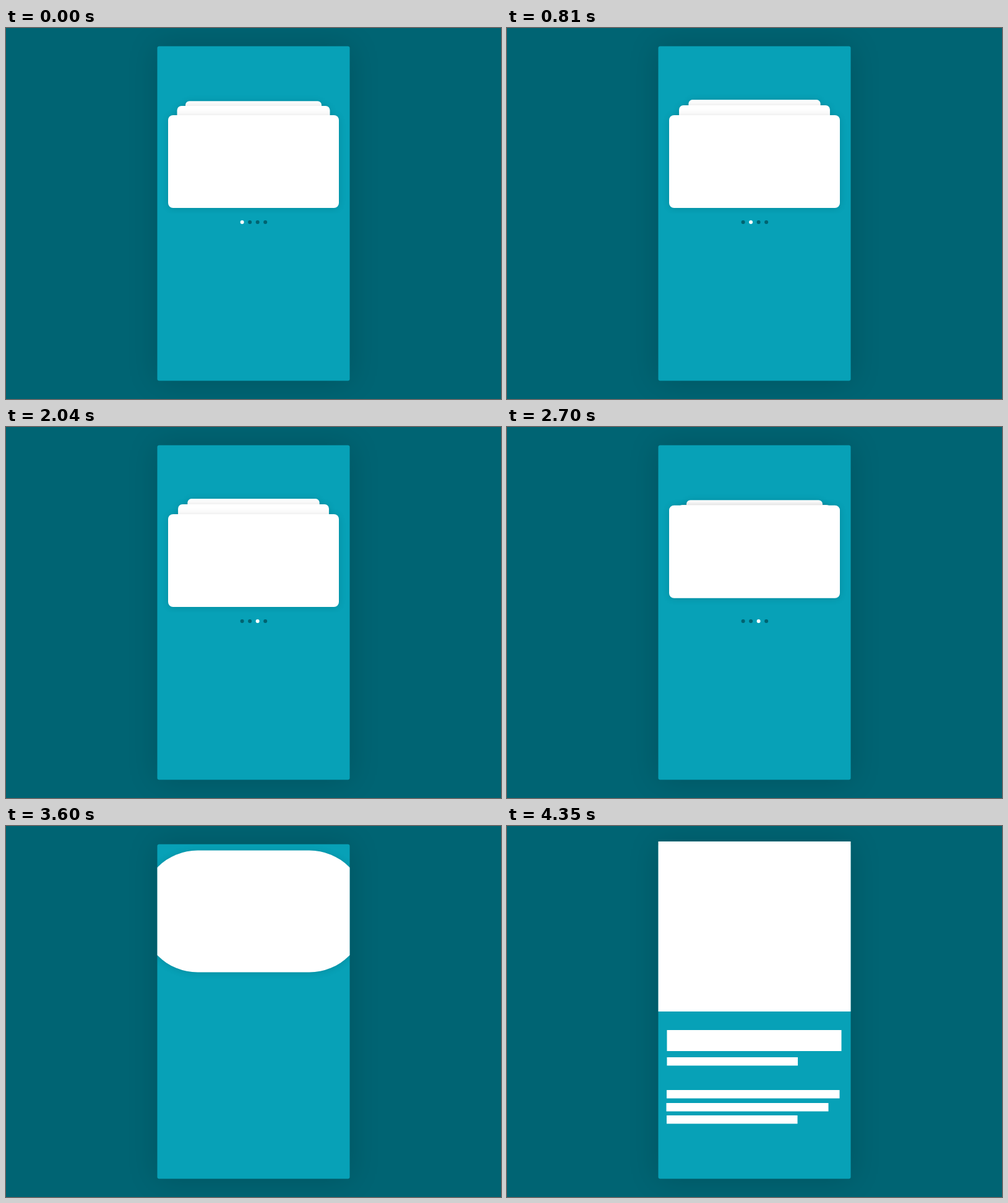
These frames come from a looping animation (800 px wide and 600 px high, 4500 ms). An HTML page with a canvas:

```html
<!DOCTYPE html>
<html lang="en">
<head>
<meta charset="utf-8">
<title>Card stack</title>
<style>
  html, body { margin: 0; width: 100%; height: 100%; overflow: hidden; background: #006473; }
  canvas { display: block; }
</style>
</head>
<body>
<canvas id="stage" width="800" height="600"></canvas>
<script>
const ctx = document.getElementById('stage').getContext('2d');
const LOOP = 4500;
const CARD = { w: 276, h: 150, r: 8 };
const PHONE = { x: 244.5, y: 29.5, w: 311, h: 541 };
const SWIPES = [180, 1410];
const LIFT = 78;

// Resting places in the stack, front to back.
const SLOTS = [
  { y: 216, s: 1 },
  { y: 193, s: 0.895 },
  { y: 178, s: 0.797 },
  { y: 170, s: 0.748 }
];

// Lines of the detail view: x, y, width, height, start time.
const BARS = [
  [258.5, 330, 282, 34, 3660],
  [258.5, 374, 211.5, 13.5, 3710],
  [258, 427, 279.5, 13.5, 3750],
  [257.5, 448, 262, 13.5, 3790],
  [258, 468, 211.5, 13.5, 3790]
];

const clamp = v => Math.min(1, Math.max(0, v));
const span = (t, from, length) => clamp((t - from) / length);
const smooth = p => p * p * (3 - 2 * p);
const mix = (a, b, p) => a + (b - a) * p;

function shadow(color, blur, dy) {
  ctx.shadowColor = color;
  ctx.shadowBlur = blur;
  ctx.shadowOffsetY = dy;
}

function box(x, y, w, h, r) {
  ctx.beginPath();
  ctx.roundRect(x, y, w, h, r);
}

function card(x, y, s, radius = CARD.r, alpha = 1) {
  if (alpha <= 0) return;
  const w = CARD.w * s, h = CARD.h * s;
  ctx.save();
  ctx.globalAlpha = alpha;
  ctx.fillStyle = '#fff';
  shadow('rgba(0,0,0,0.13)', 12, 1);
  box(x - w / 2, y - h / 2, w, h, radius * s);
  ctx.fill();
  ctx.restore();
}

function backdrop() {
  ctx.fillStyle = '#006473';
  ctx.fillRect(0, 0, 800, 600);
  ctx.save();
  shadow('rgba(0,0,0,0.16)', 50, 0);
  ctx.fillStyle = '#07a1b7';
  box(PHONE.x, PHONE.y, PHONE.w, PHONE.h, 3);
  ctx.fill();
  ctx.restore();
}

function dots(t, alpha) {
  const active = SWIPES.filter(b => t >= b).length;
  ctx.globalAlpha = alpha;
  for (let i = 0; i < 4; i++) {
    ctx.fillStyle = i === active ? '#fff' : '#016371';
    ctx.beginPath();
    ctx.arc(381.6 + i * 12.5, 314, 3, 0, Math.PI * 2);
    ctx.fill();
  }
  ctx.globalAlpha = 1;
}

// The front card leaves to the left, the others step forward one by one.
function swipe(t) {
  for (let i = 3; i > 0; i--) {
    const start = 60 + i * 120;
    const p = smooth(span(t, start, 420));
    const from = SLOTS[i], to = SLOTS[i - 1];
    const alpha = i === 3 ? span(t, start, 60) : 1;
    card(400, mix(from.y, to.y, p), mix(from.s, to.s, p), CARD.r, alpha);
  }
  const out = smooth(span(t, -15, 510));
  if (out < 1) card(400 - 305 * out, SLOTS[0].y, 1);
}

// A short nudge, then the card rises and opens into the detail view.
function open(t, alpha) {
  card(400, SLOTS[2].y, SLOTS[2].s, CARD.r, alpha);
  card(400, SLOTS[1].y, SLOTS[1].s, CARD.r, alpha);
  const nudge = 15 * Math.sin(Math.PI * span(t, 2590, 260)) ** 2;
  const rise = LIFT * span(t, 3000, 515) ** 3;
  const scale = 1 + 1.3 * smooth(span(t, 3505, 300));
  const radius = mix(CARD.r, CARD.h / 2, span(t, 3480, 132));
  card(400, SLOTS[0].y - nudge - rise, scale, radius);
}

function bars(t) {
  ctx.fillStyle = '#fff';
  for (const [x, y, w, h, start] of BARS) {
    const p = 1 - (1 - span(t, start, 290)) ** 3;
    if (p > 0) ctx.fillRect(x, y, w * p, h);
  }
}

function draw(t) {
  backdrop();
  const alpha = 1 - span(t, 3330, 170);
  dots(t, alpha);

  ctx.save();
  ctx.beginPath();
  ctx.rect(PHONE.x, 25, PHONE.w, 275);
  ctx.clip();
  const begin = SWIPES.find(b => t >= b - 15 && t < b + 870);
  if (begin !== undefined) swipe(t - begin);
  else open(t, alpha);
  ctx.restore();

  bars(t);
}

const origin = performance.now();
function tick() {
  draw((performance.now() - origin) % LOOP);
  requestAnimationFrame(tick);
}
tick();
</script>
</body>
</html>
```
